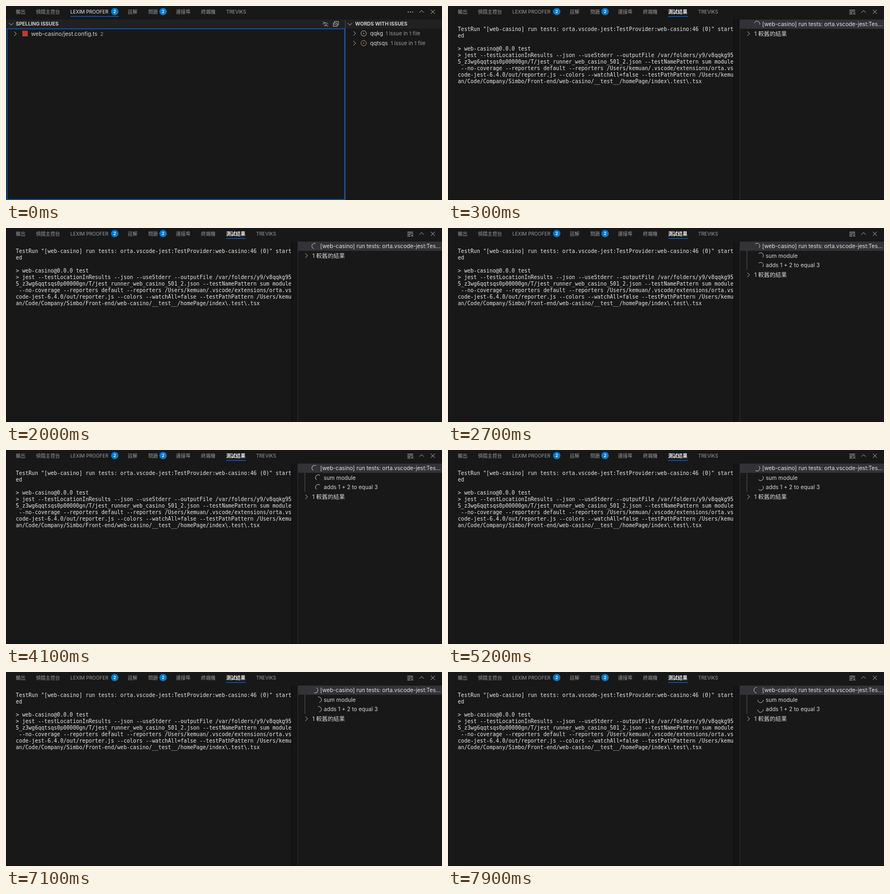
Animation, 800 px wide and 357 px high, one loop 8 s. Source, as an HTML page:

```html
<!DOCTYPE html>
<html lang="zh-Hant">
<head>
<meta charset="utf-8">
<title>Test results panel</title>
<style>
  html, body { margin: 0; width: 100%; height: 100%; overflow: hidden; background: #181818; }
  svg { display: block; width: 100%; height: 100%; }
  text { font: 10.15px Inter, "Noto Sans CJK TC", "Noto Sans CJK SC", "Noto Sans CJK JP", sans-serif; fill: #d6d6d6; white-space: pre; }
  .tab text { font-size: 8.8px; fill: #9d9d9d; }
  .tab .on { fill: #f0f0f0; }
  .tab .strong { font-weight: 700; }
  .tab .badge { font-size: 8px; font-weight: 600; fill: #fff; text-anchor: middle; }
  .head { font-size: 9.05px; font-weight: 700; fill: #cfcfcf; }
  .note { font-size: 9.5px; fill: #9a9a9a; }
  .older { font-size: 10.5px; }
  .term { font: 9.66px "DejaVu Sans Mono", "Liberation Mono", monospace; fill: #e8e8e8; }
  .icon { fill: none; stroke: #c5c5c5; stroke-width: 0.9; }
  .blue { fill: #0078d4; }
  .line { fill: #0a5ccb; }
</style>
</head>
<body>
<svg viewBox="0 0 800 357">
  <defs>
    <path id="right" class="icon" d="M-2 -4L2 0L-2 4"/>
    <path id="down" class="icon" d="M-4 -2L0 2L4 -2"/>
    <path id="arc" class="icon" d="M-5.1 -0.4A5.1 5.1 0 0 1 5.1 -0.4"/>
  </defs>
  <rect width="800" height="357" fill="#181818"/>

  <g class="tab">
    <text x="18" y="14.2">輸出</text>
    <text x="55" y="14.2">偵錯主控台</text>
    <text id="proof" x="118" y="14.2">LEXIM PROOFER</text>
    <circle class="blue" cx="199.5" cy="10.3" r="6.8"/>
    <text class="badge" x="199.5" y="13.2">2</text>
    <text x="223.5" y="14.2">註解</text>
    <text x="261" y="14.2">問題</text>
    <circle class="blue" cx="288.2" cy="10.3" r="6.8"/>
    <text class="badge" x="288.2" y="13.2">2</text>
    <text x="312" y="14.2">連接埠</text>
    <text x="358" y="14.2">終端機</text>
    <text id="last" x="404" y="14.2">TREVIKS</text>
  </g>
  <path class="icon" d="M758.5 12.2L762.5 8.2L766.5 12.2M779.5 6.9L787 14.4M787 6.9L779.5 14.4"/>

  <g id="issues">
    <rect class="line" x="118" y="18.6" width="89" height="1.4"/>
    <g fill="#c5c5c5">
      <circle cx="738" cy="11" r="0.9"/><circle cx="742" cy="11" r="0.9"/><circle cx="746" cy="11" r="0.9"/>
    </g>
    <rect y="25" width="800" height="16.5" fill="#212121"/>
    <use href="#down" x="9.5" y="33.3"/>
    <text class="head" x="18" y="36.2">SPELLING ISSUES</text>
    <path class="icon" d="M580.8 33.5Q586 27.5 591.2 33.5M584 34.5A2 2 0 0 0 588 34.5M581.5 28.5L591 38"/>
    <path class="icon" d="M600.5 31.5H607.5V37.5H600.5ZM602.5 31V28.5H610V35H607.8M602 34.5H606"/>
    <rect x="1.8" y="42" width="619.6" height="314.2" fill="none" stroke="#0a5ccb" stroke-width="1.5"/>
    <rect x="622" y="25" width="1" height="332" fill="#4a4a4a"/>
    <use href="#right" x="17" y="51"/>
    <rect x="30" y="45.5" width="10" height="10.5" fill="#c0392f"/>
    <text x="46" y="54.7">web-casino/jest.config.ts</text>
    <text class="note" x="173" y="54.7">2</text>
    <use href="#down" x="631" y="33.3"/>
    <text class="head" x="640.5" y="36.2">WORDS WITH ISSUES</text>
    <use href="#right" x="639.5" y="50.5"/>
    <use href="#right" x="639.5" y="68.5"/>
    <circle class="icon" cx="656.3" cy="50.5" r="4.9"/>
    <circle cx="656.3" cy="50.5" r="0.9" fill="#c5c5c5"/>
    <circle class="icon" cx="656.3" cy="68.5" r="4.9" style="stroke:#c99a76"/>
    <circle cx="656.3" cy="68.5" r="0.9" fill="#c99a76"/>
    <text x="668" y="54.2">qqkg</text>
    <text class="note" x="696.5" y="54.2">1 issue in 1 file</text>
    <text x="668" y="72.2">qqtsqs</text>
    <text class="note" x="706" y="72.2">1 issue in 1 file</text>
  </g>

  <g id="results">
    <g class="tab"><text class="on strong" x="404" y="14.2">測試結果</text></g>
    <rect class="line" x="404" y="18.6" width="36" height="1.4"/>
    <path class="icon" d="M736.5 7.5H747M736.5 10H747M736.5 12.5H742M736.5 15H742M743.3 11.8L747.3 15.8M747.3 11.8L743.3 15.8"/>
    <g id="log"></g>
    <rect x="524" y="25" width="11.5" height="332" fill="#151515"/>
    <rect x="524" y="25" width="1" height="332" fill="#0a0a0a"/>
    <rect x="535" y="25" width="1" height="332" fill="#303030"/>
    <rect x="536" y="25" width="264" height="17" fill="#323237"/>
    <rect width="1" height="357" fill="#0e0e0e"/>
    <rect y="356" width="800" height="1" fill="#0e0e0e"/>
    <g id="run"><use href="#arc"/></g>
    <text x="576.5" y="37" style="fill:#e4e4e4">[web-casino] run tests: orta.vscode-jest:Tes...</text>
    <g id="tests">
      <rect x="548" y="42" width="1" height="35" fill="#505050"/>
      <g id="suite"><use href="#arc"/></g>
      <text x="583" y="54.5">sum module</text>
      <g id="case"><use href="#arc"/></g>
      <text x="583" y="72.2">adds 1 + 2 to equal 3</text>
    </g>
    <g id="older">
      <use href="#right" x="551.3" y="50.8"/>
      <text class="older" x="562" y="54.5">1 較舊的結果</text>
    </g>
  </g>
</svg>
<script>
const LOOP = 8000, STEP = 100, SWITCH = 100, EXPAND = 2500;
const $ = id => document.getElementById(id);

const log = [
  'TestRun "[web-casino] run tests: orta.vscode-jest:TestProvider:web-casino:46 (0)" start',
  'ed',
  '',
  '> web-casino@0.0.0 test',
  '> jest --testLocationInResults --json --useStderr --outputFile /var/folders/y9/v8qqkg95',
  '5_z3wg6qqtsqs0p00000gn/T/jest_runner_web_casino_501_2.json --testNamePattern sum module',
  ' --no-coverage --reporters default --reporters /Users/kemuan/.vscode/extensions/orta.vs',
  'code-jest-6.4.0/out/reporter.js --colors --watchAll=false --testPathPattern /Users/kemu',
  'an/Code/Company/Simbo/Front-end/web-casino/__test__/homePage/index\\.test\\.tsx'
];
log.forEach((line, i) => {
  const el = document.createElementNS('http://www.w3.org/2000/svg', 'text');
  el.setAttribute('class', 'term');
  el.setAttribute('x', 18);
  el.setAttribute('y', 46.4 + i * 11.95);
  el.textContent = line;
  $('log').append(el);
});

// [time, degrees] pairs for the spinners
const runTurn = [[100, -15], [500, 50], [2000, 288], [2700, 405], [4100, 660], [6300, 1032], [7900, 1352]];
const testTurn = [[2500, 10], [2700, 45], [4100, 306], [6300, 696], [7900, 898]];

function turnAt(keys, t) {
  let i = 1;
  while (i < keys.length - 1 && t > keys[i][0]) i++;
  const [t0, a0] = keys[i - 1], [t1, a1] = keys[i];
  return a0 + (a1 - a0) * (t - t0) / (t1 - t0);
}

const show = (id, on) => $(id).setAttribute('visibility', on ? 'inherit' : 'hidden');
const spin = (id, x, y, a) => $(id).setAttribute('transform', `translate(${x} ${y}) rotate(${a})`);

function draw(now) {
  const t = Math.floor(now % LOOP / STEP) * STEP;
  const running = t >= SWITCH, expanded = t >= EXPAND;
  show('issues', !running);
  show('results', running);
  show('tests', running && expanded);
  $('proof').setAttribute('class', running ? '' : 'on');
  $('last').setAttribute('x', running ? 459 : 404);
  $('older').setAttribute('transform', `translate(0 ${expanded ? 35.3 : 0})`);
  spin('run', 566.8, 33.4, turnAt(runTurn, t));
  const a = turnAt(testTurn, t);
  spin('suite', 573.3, 51, a);
  spin('case', 573.3, 68.7, a);
}

const start = performance.now();
function tick() {
  draw(performance.now() - start);
  requestAnimationFrame(tick);
}
draw(0);
requestAnimationFrame(tick);
</script>
</body>
</html>
```
